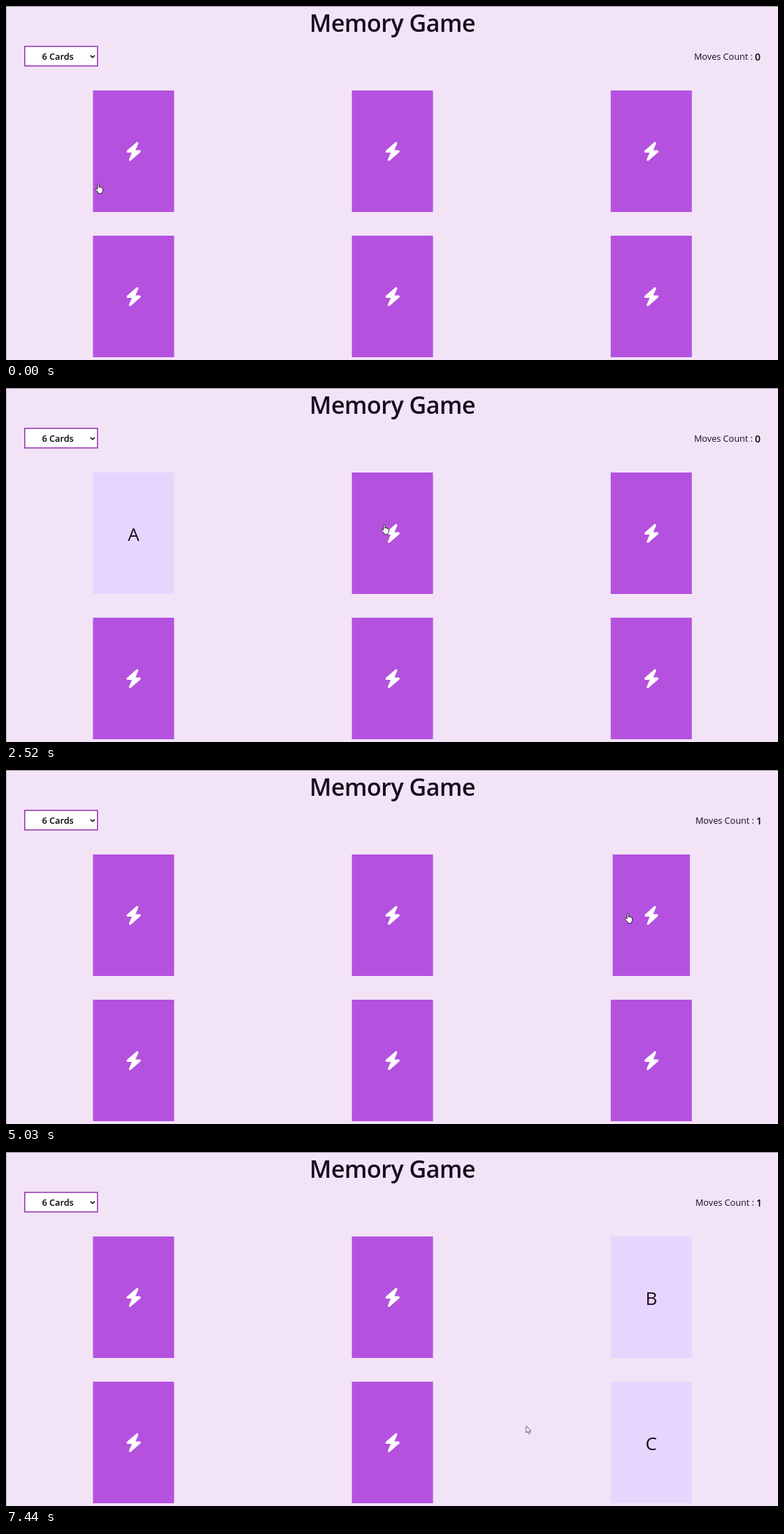
Write an HTML page that moves like this. It is 1104 px wide and 507 px high and loops after 8000 ms.

```html
<!DOCTYPE html>
<html lang="en">
<head>
<meta charset="utf-8">
<title>Memory Game</title>
<style>
  html, body { margin: 0; width: 100%; height: 100%; overflow: hidden; background: #f2e3f6; }
  svg { display: block; width: 100%; height: 100%; }
  text { font-family: "Open Sans", "Noto Sans", sans-serif; fill: #1a0a1e; }
  .title { font-size: 34px; font-weight: 600; letter-spacing: -.5px; text-anchor: middle; }
  .option { font-size: 12.7px; font-weight: 600; fill: #000; }
  .label { font-size: 12.7px; text-anchor: end; }
  .count { font-size: 14px; font-weight: 600; text-anchor: end; fill: #000; }
  .letter { font-size: 26px; text-anchor: middle; }
</style>
</head>
<body>
<svg viewBox="0 0 1104 507" preserveAspectRatio="none">
  <defs>
    <path id="bolt" fill="#fff" transform="scale(.0527) translate(-224 -256)"
      d="M349 45c6-14 2-30-10-39s-29-8-40 2l-256 224c-10 9-14 23-9 35s17 21 30 21H175L99 467c-6 14-2 30 10 39s29 8 40-2l256-224c10-9 14-23 9-35s-17-21-30-21H273z"/>
    <path id="arrow" fill="#fff" stroke="#3a3440" stroke-width=".8" d="M0 0V9.7L2.3 7.8 3.8 11 5.4 10.3 4 7.2H6.8z"/>
    <path id="hand" fill="#fff" stroke="#1a1020" stroke-width=".9" stroke-linejoin="round"
      d="M-1.1 8V1.2a1.1 1.1 0 0 1 2.2 0V5.4a1 1 0 0 1 2 .3a1 1 0 0 1 1.8.4a.9 .9 0 0 1 1.6.5V10.3L5.2 12.7V14.3H0V12.7L-3.6 9Q-4.6 7.5-3.4 7.2-2.3 7-1.1 8z"/>
  </defs>
  <rect width="1104" height="507" fill="#f2e3f6"/>
  <rect width="1" height="507" fill="#bbb2be"/>
  <rect width="1104" height="1" fill="#8f8892"/>
  <text class="title" x="552.5" y="37">Memory Game</text>
  <rect x="26.8" y="57.8" width="104" height="28" fill="#fff" stroke="#9232b0" stroke-width="1.5"/>
  <text class="option" x="51.5" y="77">6 Cards</text>
  <path d="M120.7 70.7 123.8 73.8 126.9 70.7" fill="none" stroke="#000" stroke-width="1.5"/>
  <g id="score">
    <text class="label" x="1068" y="77">Moves Count :</text>
    <text class="count" id="count" x="1079" y="78"></text>
  </g>
  <g id="cards"></g>
  <g id="pointer"><use id="arrowIcon" href="#arrow"/><use id="handIcon" href="#hand"/></g>
</svg>
<script>
const LOOP = 8000, FLIP = 400, RESET = 3960;
const CARD_W = 116, CARD_H = 174;
const $ = id => document.getElementById(id);

// Click times by card index; the first pair does not match and turns back at RESET.
const clicks = { 0: 1145, 1: 2975, 2: 4990, 5: 7085 };

// Pointer glides: start, end, x, y. It rests in between.
const home = { x: 132, y: 254.5 };
const glides = [
  [50, 270, 163.5, 239.5],
  [1380, 1920, 553, 363.5],
  [2350, 2520, 541, 195.5],
  [3050, 3310, 404, 232.5],
  [3900, 4760, 897, 200],
  [5000, 5340, 811, 258.5],
  [5590, 5740, 467, 484.5],
  [5880, 6060, 675, 384.5],
  [6180, 6850, 888, 389],
  [7130, 7440, 744, 392.5]
];

const cards = [..."ACBABC"].map((letter, i) => {
  const x = 182.4 + 370.2 * (i % 3);
  const y = i < 3 ? 208 : 416;
  const rect = color =>
    `<rect x="${-CARD_W / 2}" y="${-CARD_H / 2}" width="${CARD_W}" height="${CARD_H}" fill="${color}"/>`;
  const group = document.createElementNS("http://www.w3.org/2000/svg", "g");
  group.innerHTML =
    `<g>${rect("#b452df")}<use href="#bolt" x=".2" y=".3"/></g>` +
    `<g>${rect("#e8d5fe")}<text class="letter" y="11">${letter}</text></g>`;
  $("cards").append(group);
  const [back, face] = group.children;
  return { x, y, group, back, face, open: clicks[i] ?? Infinity };
});

const clamp = v => Math.min(1, Math.max(0, v));
const show = (el, on) => el.setAttribute("visibility", on ? "visible" : "hidden");

// The CSS "ease" curve: cubic-bezier(.25, .1, .25, 1).
function ease(x) {
  if (x <= 0 || x >= 1) return clamp(x);
  const bezier = (s, a, b) => 3 * s * (1 - s) * (1 - s) * a + 3 * s * s * (1 - s) * b + s ** 3;
  let lo = 0, hi = 1;
  for (let i = 0; i < 24; i++) {
    const mid = (lo + hi) / 2;
    if (bezier(mid, .25, .25) < x) lo = mid; else hi = mid;
  }
  return bezier(lo, .1, 1);
}

function drawCard({ x, y, group, back, face, open }, t) {
  const turnedBack = open < RESET ? ease((t - RESET) / FLIP) : 0;
  const width = Math.cos(Math.PI * (ease((t - open) / FLIP) - turnedBack));
  group.setAttribute("transform",
    `translate(${x} ${y}) scale(${Math.max(.001, Math.abs(width))} 1)`);
  show(back, width >= 0);
  show(face, width < 0);
}

function pointerAt(t) {
  return glides.reduce((from, [start, end, x, y]) => {
    const k = clamp((t - start) / (end - start));
    return { x: from.x + (x - from.x) * k, y: from.y + (y - from.y) * k };
  }, home);
}

function draw(t) {
  cards.forEach(card => drawCard(card, t));

  const moves = t < RESET ? 0 : 1;
  $("count").textContent = moves;
  $("score").setAttribute("transform", `translate(${moves * 2} 0)`);

  const { x, y } = pointerAt(t);
  const overCard = cards.some(card =>
    Math.abs(x - card.x) < CARD_W / 2 && Math.abs(y - card.y) < CARD_H / 2);
  $("pointer").setAttribute("transform", `translate(${x} ${y})`);
  show($("handIcon"), overCard);
  show($("arrowIcon"), !overCard);
}

const begin = performance.now();
function tick() {
  draw((performance.now() - begin) % LOOP);
  requestAnimationFrame(tick);
}
tick();
</script>
</body>
</html>
```
